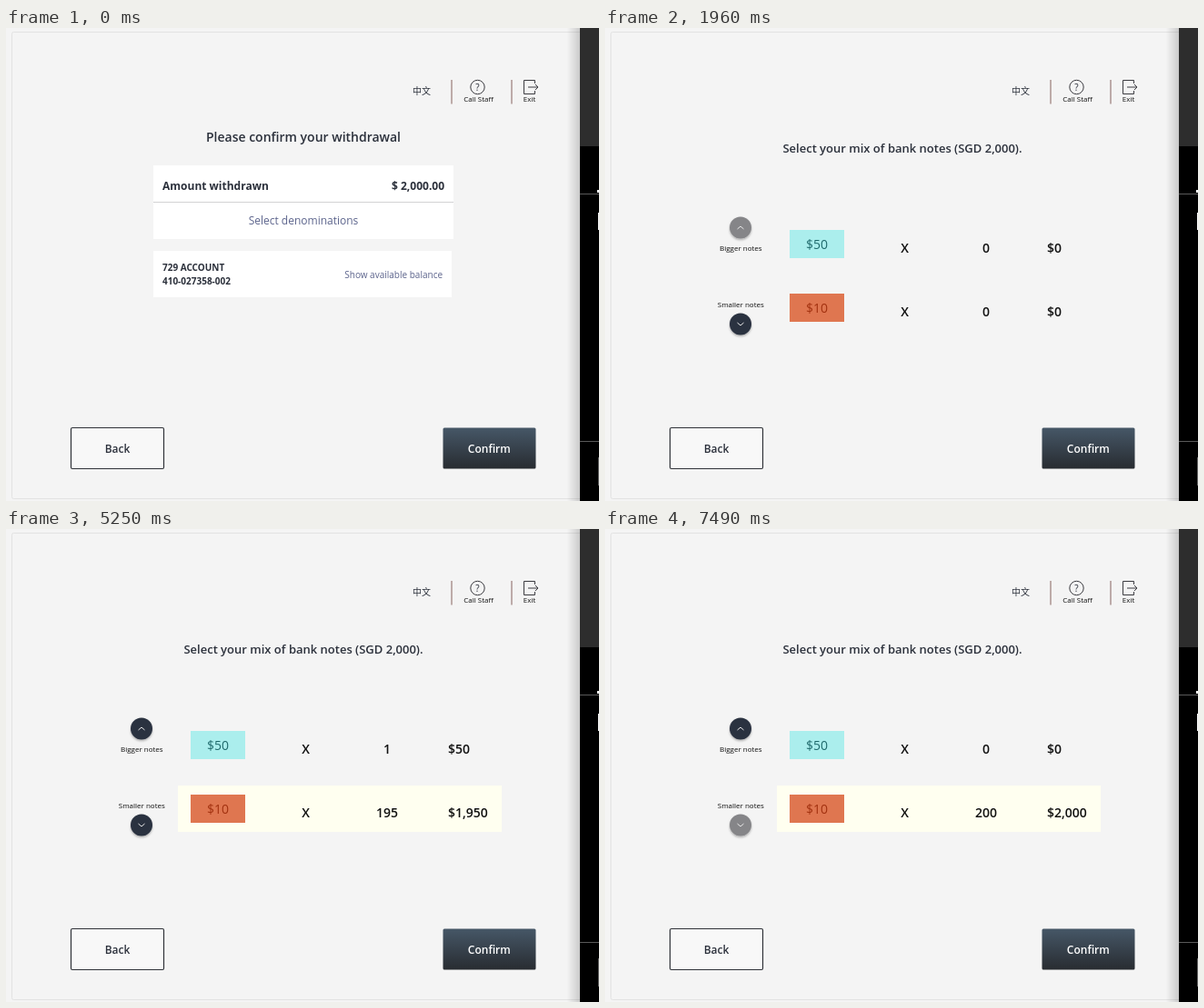
Write an HTML page that moves like this. It is 652x520 px and loops after 8 s.

```html
<!DOCTYPE html>
<html lang="en">
<head>
<meta charset="utf-8">
<title>Withdrawal</title>
<style>
  html, body { margin: 0; width: 100%; height: 100%; overflow: hidden; background: #f4f4f4; }
  svg { display: block; width: 652px; height: 520px; }
  text { font-family: "Open Sans", "Noto Sans", sans-serif; fill: #2b303b; white-space: pre; }
  .mid { text-anchor: middle; }
  .semi { font-weight: 600; }
  .bold { font-weight: 700; }
  .s8 { font-size: 8px; fill: #111; }
  .s10 { font-size: 10px; }
  .s12 { font-size: 12px; }
  .s13 { font-size: 13px; }
  .s14 { font-size: 14px; }
  .link { fill: #5c648c; }
  .white { fill: #fff; }
  .value { font-size: 14px; font-weight: 600; fill: #111; }
  .icon { fill: none; stroke: #3b3b40; stroke-width: 1; }
  [data-on] { opacity: 0; }
</style>
</head>
<body>
<svg viewBox="0 0 652 520">
  <defs>
    <linearGradient id="steel" x2="0" y2="1">
      <stop offset="0" stop-color="#465767"/>
      <stop offset="1" stop-color="#282c31"/>
    </linearGradient>
    <linearGradient id="edge">
      <stop offset="0" stop-color="#000" stop-opacity="0"/>
      <stop offset="1" stop-color="#000" stop-opacity=".17"/>
    </linearGradient>
    <linearGradient id="veil" x2="0" y2="1">
      <stop offset="0" stop-color="#444144"/>
      <stop offset="1" stop-color="#404042"/>
    </linearGradient>
    <filter id="soft" x="-30%" y="-30%" width="160%" height="160%">
      <feDropShadow dx="0" dy="1.5" stdDeviation="1.3" flood-opacity=".3"/>
    </filter>
  </defs>

  <rect width="652" height="520" fill="#f4f4f4"/>
  <rect x="6.5" y="4.5" width="630" height="513" rx="2" fill="none" stroke="#e2e2e2"/>

  <!-- header and footer -->
  <text class="s10" x="447" y="73" lang="zh" style="font-family:'Noto Sans CJK SC','Noto Sans CJK',sans-serif">中文</text>
  <path d="M490 57V83.500M556 57V83.500" stroke="#ab9390" stroke-width="1.5"/>
  <circle class="icon" cx="518.500" cy="65" r="7.700"/>
  <text class="mid s10" x="518.500" y="68.700">?</text>
  <text class="mid s8" x="519.500" y="81">Call Staff</text>
  <path class="icon" d="M581.500 61V57.500H569.500V72.500H581.500V69M574 65H585M582 62l3 3-3 3"/>
  <text class="mid s8" x="575.500" y="81">Exit</text>
  <rect x="71.500" y="439.500" width="102" height="45" rx="1.500" fill="#f8f8f8" stroke="#2f3238" stroke-width="1.200"/>
  <text class="mid semi s12" x="122.500" y="466.500">Back</text>
  <rect x="480.500" y="439.500" width="102" height="45" rx="1.500" fill="url(#steel)"/>
  <text class="mid semi s12 white" x="531.300" y="466.500">Confirm</text>

  <g data-on="0 700">
    <text class="mid semi s14" x="327" y="124.500">Please confirm your withdrawal</text>
    <path d="M162 151H492V232H162ZM162 245H490V296H162Z" fill="#fff"/>
    <path d="M162 191.500H492" stroke="#d2d2d4"/>
    <text class="bold s12" x="172" y="178">Amount withdrawn</text>
    <text class="bold s12" x="482" y="178" text-anchor="end">$ 2,000.00</text>
    <text class="mid s12 link" x="327" y="216">Select denominations</text>
    <text class="bold s10" x="172" y="267">729 ACCOUNT</text>
    <text class="bold s10" x="172" y="282">410-027358-002</text>
    <text class="s10 link" x="480" y="274.500" text-anchor="end">Show available balance</text>
  </g>

  <g data-on="1960 8000">
    <text class="mid semi s13" x="327" y="137">Select your mix of bank notes (SGD 2,000).</text>
    <rect data-on="2030 8000" x="189" y="282" width="356" height="51" fill="#fffff0"/>
    <rect x="203" y="222" width="60" height="31" fill="#abeeed"/>
    <rect x="203" y="292" width="60" height="31" fill="#df7650"/>
    <text class="mid s14" x="233" y="243" style="fill:#1f6a6c">$50</text>
    <text class="mid s14" x="233" y="313" style="fill:#a2310f">$10</text>
    <text class="mid value" x="329.500" y="246.500">X</text>
    <text class="mid value" x="329.500" y="316.500">X</text>
    <text class="mid s8" x="149.300" y="245">Bigger notes</text>
    <text class="mid s8" x="149.300" y="306.500">Smaller notes</text>
    <g id="mixes"></g>
  </g>

  <g data-on="700 1960">
    <rect x="7" y="5" width="630" height="512" fill="url(#veil)"/>
    <rect x="52" y="123" width="550" height="276" rx="6" fill="#f4f4f4" filter="url(#soft)"/>
    <path d="M579.500 136.500l9.500 9.500M589 136.500l-9.500 9.500" stroke="#111" stroke-width="1.200"/>
    <text class="mid semi" x="327" y="202.700" font-size="21">How would you like to select your notes?</text>
    <text class="mid s14" x="327" y="244.500">Choose from various pre-selected mixes (faster option), or enter the</text>
    <text class="mid s14" x="327" y="262.500">quantities for all notes separately.</text>
    <g filter="url(#soft)" fill="#2c3341">
      <rect x="184.500" y="314" width="112" height="45" rx="2"/>
      <rect x="357.500" y="314" width="112" height="45" rx="2"/>
    </g>
    <text class="mid semi s12 white" x="240.300" y="341">Choose mix</text>
    <text class="mid semi s12 white" x="413.500" y="341">Enter quantities</text>
  </g>

  <!-- right margin -->
  <rect x="617" width="14" height="520" fill="url(#edge)"/>
  <rect x="631" width="21" height="520" fill="#000"/>
  <rect x="631" width="21" height="130" fill="#2d2d2d"/>
  <path d="M631 182.500H652M631 454.500H652" stroke="#5a5a5a"/>
  <path d="M650 178h2v3h-2zM651 203h1v19h-1z" fill="#fff"/>
  <path d="M651 472h1v31h-1z" fill="#666"/>
</svg>
<script>
const LOOP = 8000;
const mixes = [
  { from: 1960, to: 2030, fifties: 0, tens: 0, up: false, down: true },
  { from: 2030, to: 4480, fifties: 2, tens: 190, up: false, down: true },
  { from: 4480, to: 5950, fifties: 1, tens: 195, up: true, down: true },
  { from: 5950, to: LOOP, fifties: 0, tens: 200, up: true, down: false },
];

const row = (count, note, y) => `
  <text class="mid value" x="419" y="${y}">${count}</text>
  <text class="value" x="486" y="${y}">$${(count * note).toLocaleString("en-US")}</text>`;

const arrow = (y, dir, enabled) => `
  <circle cx="149" cy="${y}" r="12" fill="${enabled ? "#2a3140" : "#858588"}" filter="url(#soft)"/>
  <path d="M145.500 ${y - 1.5 * dir}l3.500 ${3 * dir} 3.500 ${-3 * dir}" fill="none" stroke="#e8e8e8"/>`;

document.getElementById("mixes").innerHTML = mixes.map(m => `
  <g data-on="${m.from} ${m.to}">
    ${row(m.fifties, 50, 246.5)}${row(m.tens, 10, 316.5)}
    ${arrow(219.5, -1, m.up)}${arrow(325.5, 1, m.down)}
  </g>`).join("");

for (const el of document.querySelectorAll("[data-on]")) {
  const [from, to] = el.dataset.on.split(" ").map(Number);
  const steps = [[0, from === 0 ? 1 : 0], [from, 1], [to, to === LOOP ? 1 : 0], [LOOP, to === LOOP ? 1 : 0]];
  el.animate(
    steps.map(([time, opacity]) => ({ offset: time / LOOP, opacity, easing: "steps(1, end)" })),
    { duration: LOOP, iterations: Infinity }
  ).startTime = 0;
}
</script>
</body>
</html>
```
